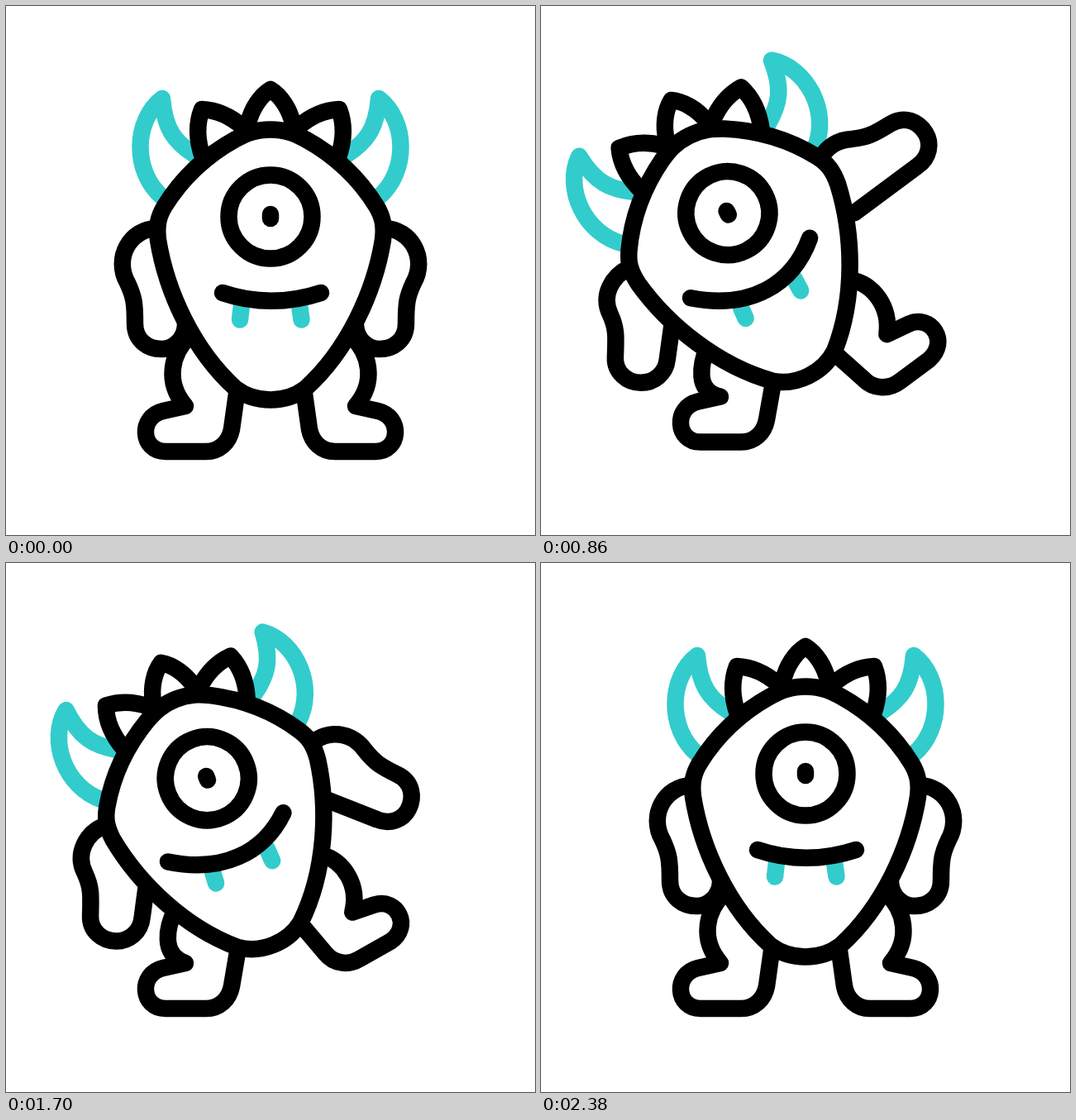
These frames come from a looping animation (640x640 px, 2400 ms). An HTML page with a canvas:

```html
<!DOCTYPE html>
<html lang="en">
<head>
<meta charset="utf-8">
<title>Waving monster</title>
<style>
  html, body { margin: 0; height: 100%; overflow: hidden; background: #fff; }
  canvas { display: block; }
</style>
</head>
<body>
<canvas width="640" height="640"></canvas>
<script>
const ctx = document.querySelector('canvas').getContext('2d');
const LOOP = 2400, LEAN_PEAK = 1196, BLACK = '#000', TEAL = '#33cccc';
const TILT = 28.4 * Math.PI / 180, HIP = [284.4, 458.5], SHOULDER = [452, 287];
const MIRROR = new DOMMatrix([-1, 0, 0, 1, 640, 0]);

// Parts that follow the body
const BODY = new Path2D(`M320 149.5 C340 149.5 352 156 362 161 C400 182 427 208 448 242
  C456 255 458 266 456 283 C446 345 414 416 362 463 C338 481 302 481 278 463
  C226 416 194 345 184 283 C182 266 184 255 192 242 C213 208 240 182 278 161
  C288 156 300 149.5 320 149.5Z`);
const HORN = new Path2D('M190 232 C152 200 155 138 189 112 C192 150 205 165 228 180');
const SIDE_SPIKE = new Path2D('M238 183 C231 163 230 143 237 125 C255 126 270 132 286 146');
const TOP_SPIKE = new Path2D('M293 142 C297 125 307 109 320 101 C333 109 343 125 347 142');
const PUPIL = new Path2D('M320 252 V257');
const WAVING_ARM = new Path2D(`M458 269 C490 270 510 305 493 335 C485 352 484 360 484 384
  C484 405 468 415 452 415 C437 415 424 403 423 386 L415 290`);

// Parts that bend: standing pose, leaning pose
const ARM = [
  'M182 269 C150 270 130 305 147 335 C155 352 156 360 156 384 C156 405 172 415 188 415 C203 415 216 403 217 386 L217 380',
  'M100 333 C82 343 68 365 79 388 C87 405 86 415 85 440 C84 458 99 471 116 471 C132 471 146 460 148 443 L154 400'];
const LEFT_LEG = [
  'M222 400 C200 420 192 455 217 484 L190 490 C160 497 163 539 193 539 L242 539 C258 539 270 528 273 512 L280 462',
  'M200 425 C193 445 185 480 217 484 L190 490 C160 497 163 539 193 539 L242 539 C258 539 270 528 273 512 L282 462'];
const RIGHT_LEG = [
  'M418 400 C440 420 448 455 423 484 L450 490 C480 497 477 539 447 539 L398 539 C382 539 370 528 367 512 L360 462',
  'M370 338 C400 342 421 370 418 403 L445 389 C471 376 496 408 471 432 L437 460 C424 471 405 471 393 460 L358 432'];
const MOUTH = [
  'M262 347 C300 360 342 360 381 347',
  'M175 366 C250 380 302 348 321 288'];
const TEETH = [
  'M285 362 L283 379.5 M355 362 L357.5 379.5',
  'M239 378 L245 390 M303 340 L311 354'];

const smooth = x => {
  x = Math.min(1, Math.max(0, x));
  return x * x * (3 - 2 * x);
};
const pulse = (t, peak, width) => smooth(1 - Math.abs(t - peak) / width);

// Symmetric cubic-bezier(a, 0, 1 - a, 1)
function ease(x, a = 0.77) {
  let low = 0, high = 1;
  for (let i = 0; i < 24; i++) {
    const s = (low + high) / 2, r = 1 - s;
    if (3 * a * s * r * r + 3 * (1 - a) * s * s * r + s ** 3 < x) low = s;
    else high = s;
  }
  return low * low * (3 - 2 * low);
}

function keyed(t, keys) {
  return keys.reduce((value, [time, next], i) => {
    if (!i) return next;
    const [start, from] = keys[i - 1];
    return value + (next - from) * smooth((t - start) / (time - start));
  }, 0);
}

function bend([from, to], amount) {
  const target = to.match(/[\d.]+/g);
  let i = 0;
  return new Path2D(from.replace(/[\d.]+/g, n => +n + (target[i++] - n) * amount));
}

// Points travel straight from the upright to the tilted position
function leanMatrix(amount) {
  const c = 1 + (Math.cos(TILT) - 1) * amount, s = Math.sin(TILT) * amount;
  return new DOMMatrix().translate(...HIP)
    .multiply(new DOMMatrix([c, -s, s, c, 0, 0]))
    .translate(-HIP[0], -HIP[1]);
}

function stroke(path, matrix = new DOMMatrix(), color = BLACK, fill) {
  const placed = new Path2D();
  placed.addPath(path, matrix);
  if (fill) {
    ctx.fillStyle = fill;
    ctx.fill(placed);
  }
  ctx.strokeStyle = color;
  ctx.stroke(placed);
}

function drawEye(matrix, lean, lid) {
  const drop = 45.5 * lid;
  const center = matrix.transformPoint(new DOMPoint(320, 255 + drop));
  const ring = new Path2D();
  ring.ellipse(center.x, center.y, 50.5, 50.5 - drop, -TILT * lean, 0, 2 * Math.PI);
  stroke(ring);
  stroke(PUPIL, matrix.translate(0, drop));
}

function draw(t) {
  const lean = ease(1 - Math.abs(t - LEAN_PEAK) / LEAN_PEAK);
  const jump = 42 * pulse(t, 690, 260);
  const swing = keyed(t, [[480, 0], [720, 104], [1140, 71], [1560, 104], [1810, 0]]);
  const body = leanMatrix(lean), mirrored = body.multiply(MIRROR);
  const arm = body.translate(...SHOULDER).rotate(-swing).translate(-SHOULDER[0], -SHOULDER[1]);

  ctx.setTransform(1, 0, 0, 1, 0, 0);
  ctx.fillStyle = '#fff';
  ctx.fillRect(0, 0, 640, 640);
  ctx.translate(0, -jump);
  ctx.lineWidth = 20.5;
  ctx.lineCap = ctx.lineJoin = 'round';

  stroke(HORN, body, TEAL);
  stroke(HORN, mirrored, TEAL);
  stroke(SIDE_SPIKE, body);
  stroke(SIDE_SPIKE, mirrored);
  stroke(TOP_SPIKE, body);
  for (const limb of [LEFT_LEG, RIGHT_LEG, ARM]) stroke(bend(limb, lean));
  stroke(WAVING_ARM, arm);
  stroke(BODY, body, BLACK, '#fff');
  stroke(bend(TEETH, lean), undefined, TEAL);
  stroke(bend(MOUTH, lean));
  drawEye(body, lean, pulse(t, 440, 140));
}

function tick() {
  draw(performance.now() % LOOP);
  requestAnimationFrame(tick);
}
tick();
</script>
</body>
</html>
```
